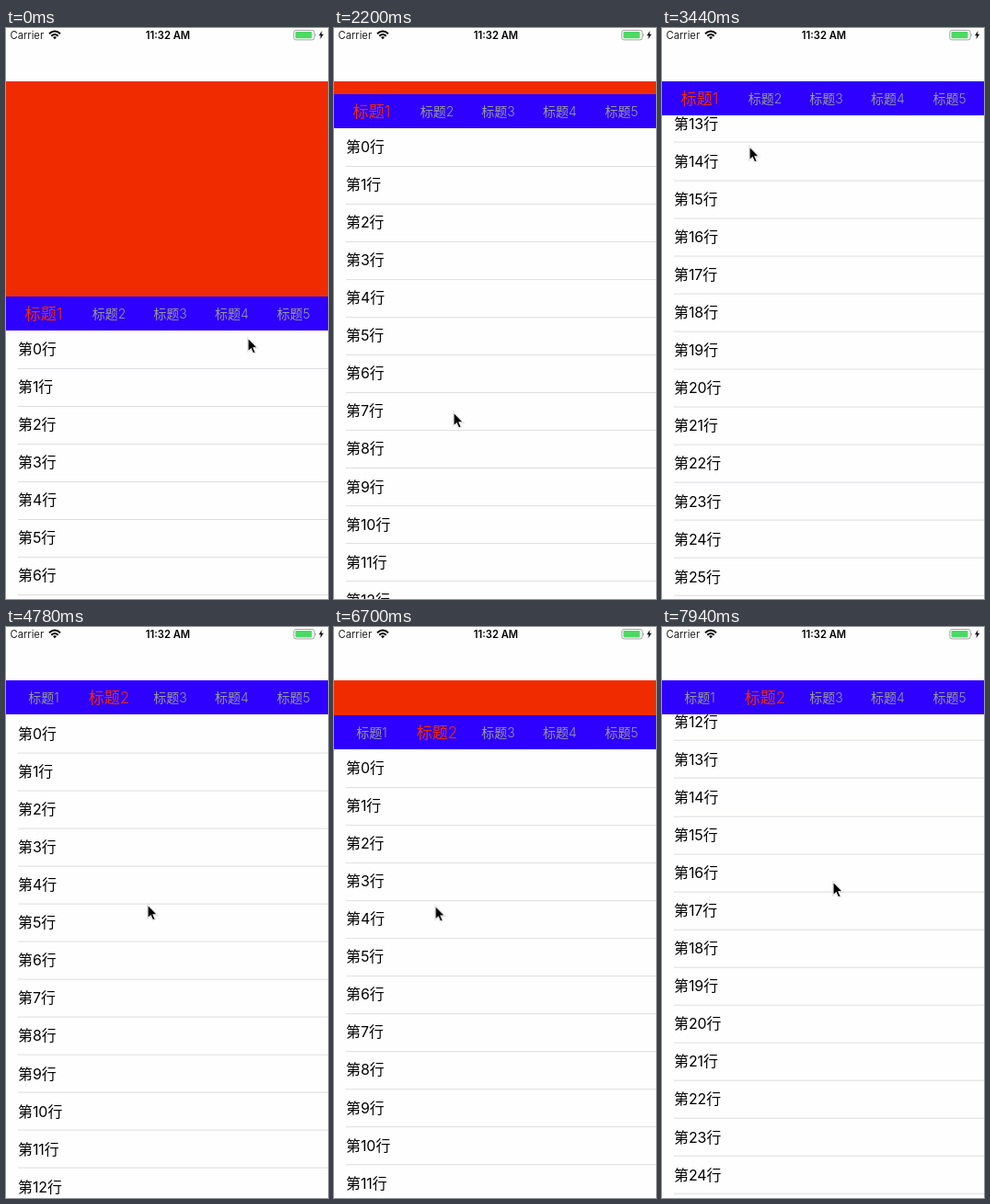
Animation, 350 px wide and 621 px high, one loop 8 s. Source, as an HTML page:

```html
<!DOCTYPE html>
<html lang="zh-CN">
<head>
<meta charset="utf-8">
<title>Sticky tabs</title>
<style>
@property --a { syntax: '<length>'; inherits: true; initial-value: 0px; }
@property --b { syntax: '<length>'; inherits: true; initial-value: 0px; }
@property --slide { syntax: '<length>'; inherits: true; initial-value: 0px; }

html, body { margin: 0; width: 100%; height: 100%; overflow: hidden; background: #fefefe; }
#stage {
  --red: #f12b00;
  --head: max(58.2px, 291.6px - max(var(--a), var(--b)));
  position: relative; width: 350px; height: 621px; overflow: hidden;
  font-family: Inter, "Noto Sans CJK SC", sans-serif; color: #000;
  animation: first 8s infinite, second 8s infinite, slide 8s infinite;
}
#stage > * { position: absolute; }
#lists { left: 0; top: 58px; width: 350px; height: 563px; overflow: hidden; }
.list { position: absolute; left: 0; top: 270.9px; width: 350px; }
.list:first-child { transform: translate(var(--slide), calc(0px - var(--a))); }
.list:last-child { transform: translate(calc(350px + var(--slide)), calc(0px - var(--b))); }
.row {
  position: absolute; left: 13px; right: 0; height: 41.67px; box-sizing: border-box;
  border-bottom: 1px solid #dedee0; font-size: 15.9px; line-height: 41px; white-space: nowrap;
}
#banner { left: 0; top: 58px; width: 350px; height: calc(var(--head) - 58px); background: var(--red); }
#bar { left: 0; top: var(--head); width: 350px; height: 37.3px; background: #2d00ff; }
.tab {
  position: absolute; top: 0; width: 60px; margin-left: -30px; text-align: center;
  font-size: 14px; font-weight: 300; line-height: 37px; color: #999; white-space: nowrap;
}
.tab:nth-child(1) { animation: off 8s infinite; }
.tab:nth-child(2) { animation: on 8s infinite; }
#status { left: 0; top: 0; }
#cursor {
  left: 0; top: 0; overflow: visible; filter: drop-shadow(0 .6px .7px #0006);
  animation: move 8s infinite linear;
}

@keyframes first {
  0%, 22.9% { --a: 0px; animation-timing-function: cubic-bezier(.3, .1, .65, .85); }
  27.5% { --a: 219.4px; animation-timing-function: cubic-bezier(.2, .6, .4, 1); }
  33.5% { --a: 300px; animation-timing-function: cubic-bezier(.35, .1, .4, 1); }
  43%, 55% { --a: 779.4px; }
  55.01%, 100% { --a: 0px; }
}
@keyframes second {
  0%, 43.7% { --b: 0px; }
  43.71%, 61% { --b: 233.4px; animation-timing-function: ease-in-out; }
  70.5%, 77.5% { --b: 0px; animation-timing-function: cubic-bezier(.35, .1, .7, .8); }
  83.75% { --b: 195.4px; animation-timing-function: cubic-bezier(.2, .6, .4, 1); }
  90.5% { --b: 270px; animation-timing-function: cubic-bezier(.35, .1, .5, 1); }
  99.25%, 100% { --b: 739.3px; }
}
@keyframes slide {
  0%, 48.75% { --slide: 0px; animation-timing-function: ease-in-out; }
  52.5%, 100% { --slide: -350px; }
}
@keyframes off {
  0%, 48.75% { transform: scale(1.22); color: var(--red); }
  51%, 100% { transform: none; color: #999; }
}
@keyframes on {
  0%, 48.75% { transform: none; color: #999; }
  51%, 100% { transform: scale(1.22); color: var(--red); }
}
@keyframes move {
  0%, 2.9% { transform: translate(263px, 337px); animation-timing-function: ease-in-out; }
  12.25%, 13% { transform: translate(136px, 425px); animation-timing-function: ease-in-out; }
  17% { transform: translate(144px, 346px); animation-timing-function: ease-in-out; }
  22.4% { transform: translate(140px, 474px); }
  27.5% { transform: translate(130px, 418px); }
  33.5% { transform: translate(126px, 400px); animation-timing-function: ease-in-out; }
  43% { transform: translate(95px, 129px); }
  47.5%, 50% { transform: translate(107px, 76px); animation-timing-function: ease-in-out; }
  59.75%, 61% { transform: translate(154px, 302px); animation-timing-function: ease-in-out; }
  67% { transform: translate(140px, 480px); animation-timing-function: ease-in-out; }
  73% { transform: translate(99px, 307px); }
  77.5% { transform: translate(113px, 485px); }
  83.75% { transform: translate(110px, 303px); }
  90.5% { transform: translate(165px, 450px); animation-timing-function: ease-in-out; }
  99.25%, 100% { transform: translate(186px, 277px); }
}
</style>
</head>
<body>
<div id="stage">
  <div id="lists"><div class="list"></div><div class="list"></div></div>
  <div id="banner"></div>
  <div id="bar"></div>
  <svg id="status" width="350" height="20" font-family="Inter, sans-serif" font-size="11.2">
    <text x="4.5" y="11.6" fill="#222">Carrier</text>
    <text x="176" y="11.6" text-anchor="middle" font-weight="600">11:32 AM</text>
    <path d="M47 6.2Q53 .8 59 6.2M49.3 8.7Q53 5.3 56.7 8.7" fill="none" stroke="#000" stroke-width="2"/>
    <path d="M51 10Q53 8.4 55 10L53 12.2Z"/>
    <rect x="312.8" y="2.5" width="22.4" height="10.4" rx="2.4" fill="none" stroke="#999" stroke-width=".9"/>
    <rect x="314.5" y="4.1" width="18" height="7.2" rx="1" fill="#4cd964"/>
    <path d="M336.2 6Q338 7.7 336.2 9.4Z" fill="#999"/>
    <path d="M343.6 3L340 8.2H342.2L341.3 12.3L345.2 6.8H342.8Z"/>
  </svg>
  <svg id="cursor" width="12" height="19">
    <path d="M0 0V14.8L3.3 11.8L5.6 17L8.2 15.9L6 10.9H10.6Z" stroke="#fff" stroke-width="1.1"/>
  </svg>
</div>
<script>
const rows = Array.from({ length: 32 }, (_, i) =>
  `<div class="row" style="top:${(i * 41.07).toFixed(2)}px">第${i}行</div>`).join('');
document.querySelectorAll('.list').forEach(list => list.innerHTML = rows);

document.getElementById('bar').innerHTML = [41, 111.5, 178.5, 245.5, 312.5].map((x, i) =>
  `<div class="tab" style="left:${x}px">标题${i + 1}</div>`).join('');
</script>
</body>
</html>
```
